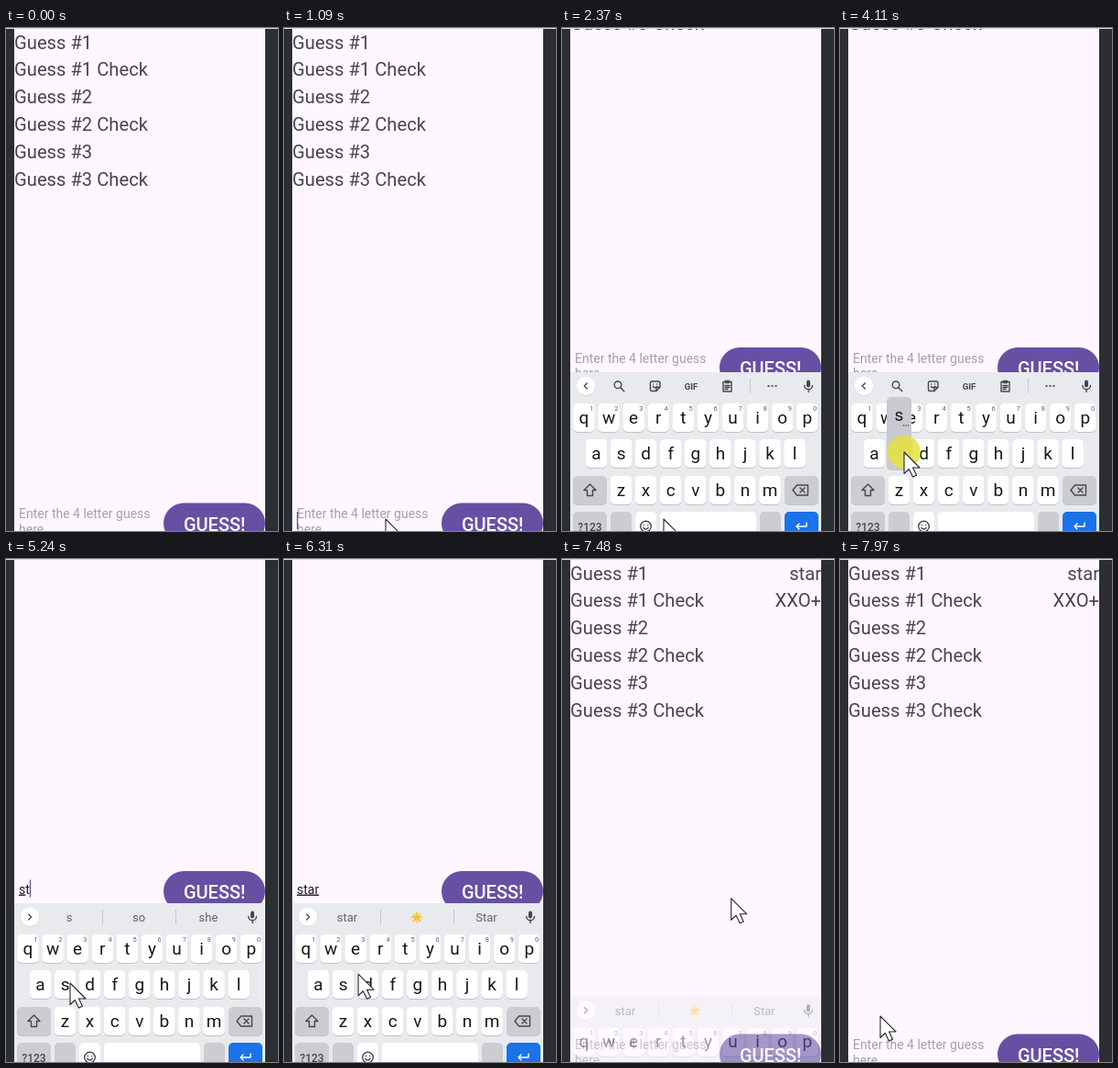
An HTML page for the animation above (8 s loop, 297x548 px).

```html
<!DOCTYPE html>
<html lang="en">
<head>
<meta charset="utf-8">
<title>Word guess</title>
<style>
html, body { margin: 0; width: 100%; height: 100%; overflow: hidden; background: #2b2e33; }
svg { display: block; width: 297px; height: 548px; font-family: Roboto, sans-serif; }
.row { font-size: 20.2px; fill: #49454f; }
.field { font-size: 14px; fill: #1d1b20; }
.hint { fill: #a5a0a8; }
.label { font-size: 20px; font-weight: 500; fill: #fff; }
.key { font-size: 19px; fill: #17181a; }
.digit { font-size: 7.5px; fill: #5f6368; }
.word { font-size: 13px; fill: #5f6368; }
.mid { text-anchor: middle; }
.end { text-anchor: end; }
.icon { fill: none; stroke: #44474b; stroke-width: 1.4; stroke-linecap: round; stroke-linejoin: round; }
</style>
</head>
<body>
<svg viewBox="0 0 297 548">
  <defs><clipPath id="screenClip"><path d="M9 1h274v547H9z"/></clipPath></defs>
  <rect width="297" height="548" fill="#2b2e33"/>
  <rect width="297" height="1" fill="#dcd8de"/>
  <g clip-path="url(#screenClip)">
    <rect x="9" y="1" width="274" height="547" fill="#fef7ff"/>
    <g id="content">
      <g id="rows" class="row"></g>
      <g id="results" class="row end"><text x="283" y="22.5">star</text><text x="283" y="52.3">XXO+</text></g>
      <g id="hint">
        <text class="field hint" x="14" y="534">Enter the 4 letter guess</text>
        <text class="field hint" x="14" y="550.5">here</text>
        <rect x="14" y="555" width="152" height="1.2" fill="#605a72"/>
      </g>
      <text id="input" class="field" x="14" y="542"><tspan id="marked" text-decoration="underline"></tspan><tspan id="fresh"></tspan></text>
      <rect id="caret" y="527" width="1.3" height="19" fill="#6750a4"/>
      <rect id="button" x="172" y="517.5" width="111" height="44" rx="22"/>
      <text class="label mid" x="227.7" y="547.5">GUESS!</text>
    </g>
    <rect id="gap" x="9" y="414" width="274" height="134"/>
    <g id="keyboard">
      <rect x="9" y="375" width="274" height="190" fill="#e8eaed"/>
      <circle cx="26" cy="390.5" r="10.3" fill="#c8cacd"/>
      <circle cx="26" cy="390" r="10.2" fill="#fff"/>
      <g class="icon">
        <rect x="267" y="383.5" width="4" height="8" rx="2" fill="#44474b" stroke="none"/>
        <path d="M264.8 389.5a4.3 4.3 0 0 0 8.6 0M269.1 394v2.5"/>
      </g>
      <g id="tools">
        <g class="icon">
          <path d="M27.3 387l-3 3 3 3M63.8 391.8l4 4"/>
          <circle cx="61" cy="388.8" r="3.8"/>
          <path d="M98 385h7.5q1.5 0 1.5 1.5v5l-4 4h-5q-1.500 0-1.500-1.500v-7.500q0-1.500 1.500-1.500zM99.500 390.500q2 2.500 4.500 0M99.700 388h.1M103.500 388h.1M103 395v-3.500h4"/>
          <path d="M176 385.500h9v10.500h-9zM178.500 384.500h4v2h-4zM178 389.500h5M178 391.500h5M178 393.500h3"/>
          <path d="M225.500 390h.1M229.500 390h.1M233.500 390h.1" stroke-width="2.200"/>
        </g>
        <text class="mid" x="141" y="393.500" font-size="9.500" font-weight="700" fill="#44474b">GIF</text>
        <path d="M205.500 382v16" stroke="#c6c8cb"/>
      </g>
      <g id="words">
        <path class="icon" d="M24.700 387l3 3-3 3"/>
        <path d="M105.500 382v16M185.500 382v16" stroke="#c6c8cb"/>
        <text class="word mid" x="69" y="395"></text>
        <text class="word mid" x="145" y="395"></text>
        <text class="word mid" x="221" y="395"></text>
        <g id="glow" transform="translate(145 390.500)">
          <path d="M-4.500-4.500l9 9M4.500-4.500l-9 9M-6.500 0h13M0-6.500v13" stroke="#f7cf6a" stroke-width="1.500"/>
          <polygon id="star" fill="#fbc02d"/>
        </g>
      </g>
      <g id="keys"></g>
      <g class="icon">
        <path d="M30.500 497l-6.500 6.500h3.500v6h6v-6h3.500z"/>
        <path d="M256.500 498h12v11h-12l-4.500-5.500zM260 501l5 5M265 501l-5 5"/>
        <circle cx="91.500" cy="543" r="5.800"/>
        <path d="M89.300 541.500h.1M93.700 541.500h.1M88.800 544.500q2.700 3 5.400 0"/>
        <path d="M267 539v4h-11M259 540l-3 3 3 3" stroke="#fff"/>
      </g>
      <text class="mid" x="30.500" y="547.500" font-size="12" font-weight="500" fill="#44474b">?123</text>
      <g id="popup">
        <rect x="51" y="402" width="27" height="80" rx="5" fill="#c8cad0"/>
        <text class="key mid" x="64.500" y="428">s</text>
        <path d="M69.500 433h.1M72 433h.1M74.500 433h.1" class="icon" stroke-width="1"/>
      </g>
    </g>
  </g>
  <g id="pointer">
    <circle id="press" r="18" fill="#e6e23c" opacity=".85"/>
    <path d="M0 0v23.500l5.300-5 4.200 8.500 4-1.800-4-8.200h7.500z" fill="#fff" stroke="#26262a" stroke-width="1.100" stroke-linejoin="round"/>
  </g>
</svg>
<script>
const $ = id => document.getElementById(id);
const show = (id, on) => $(id).setAttribute('visibility', on ? 'visible' : 'hidden');
const move = (id, x, y) => $(id).setAttribute('transform', `translate(${x} ${y})`);

$('rows').innerHTML = [0, 1, 2, 3, 4, 5].map(i =>
  `<text x="9" y="${22.5 + i * 29.8}">Guess #${(i >> 1) + 1}${i % 2 ? ' Check' : ''}</text>`).join('');

$('star').setAttribute('points', Array.from({ length: 10 }, (_, i) => {
  const r = i % 2 ? 2.6 : 6, a = i * Math.PI / 5;
  return [r * Math.sin(a), -r * Math.cos(a)].map(v => v.toFixed(2));
}).join(' '));

// Keyboard caps
const cap = (x, y, w, fill = '#fff') =>
  `<rect x="${x}" y="${y + 1}" width="${w}" height="31" rx="5" fill="#bfc2c6"/>` +
  `<rect x="${x}" y="${y}" width="${w}" height="31" rx="5" fill="${fill}"/>`;
const letters = (text, x0, y, digits) => [...text].map((c, i) => {
  const x = x0 + i * 27.08;
  return cap(x - 11.8, y, 23.6) + `<text class="key mid" x="${x}" y="${y + 21.5}">${c}</text>` +
    (digits ? `<text class="digit mid" x="${x + 8.3}" y="${y + 8}">${(i + 1) % 10}</text>` : '');
}).join('');
const GREY = '#cbcdd2';
$('keys').innerHTML =
  letters('qwertyuiop', 24, 409, true) + letters('asdfghjkl', 37.5, 448) + letters('zxcvbnm', 64.5, 488) +
  cap(12, 488, 37, GREY) + cap(243, 488, 37, GREY) +
  cap(12, 527, 37, GREY) + cap(53, 527, 23, GREY) + cap(80, 527, 23) +
  cap(107, 527, 105) + cap(216, 527, 23, GREY) + cap(243, 527, 37, '#1a73e8');

// Timelines: [time, values...]
const pointerPath = [
  [380, 142, 546], [730, 111, 535], [2400, 111, 535], [2930, 54, 462], [3150, 53, 466], [3400, 52, 462],
  [3830, 52, 462], [4050, 70, 462], [6230, 70, 462], [6720, 222, 328], [6950, 224, 346],
  [7300, 224, 346], [7900, 44, 455], [7970, 44, 498]];
const scrollPath = [[2160, -149.5], [2340, -169.5]];
const keyboardPath = [[1740, 173, 0], [1970, 0, 1], [7330, 0, 1], [7600, 173, 0]];
const typing = [[0, '', ''], [4280, 's', ''], [5240, 's', 't'], [5440, 'st', ''], [5510, 'st', 'a'],
  [5710, 'sta', 'r'], [5910, 'star', ''], [7280, '', '']];
const suggestions = [[4430, 's', 'so', 'she'], [5440, 'st', 'still', 'stop'],
  [5640, 'sta', 'stay', 'star'], [5980, 'star', '', 'Star']];
const caretOn = [[1070, 1570], [2490, 3000], [3490, 3990], [4280, 4780], [5240, 6240], [6710, 7210]];
const pressed = [[800, 1090], [4050, 4280], [7140, 7280]];

const within = (spans, t) => spans.some(([a, b]) => t >= a && t < b);
const latest = (steps, t) => steps.findLast(s => s[0] <= t);
function tween(path, t) {
  const i = path.findIndex(p => p[0] > t);
  if (i < 1) return (i ? path.at(-1) : path[0]).slice(1);
  const [a, b] = [path[i - 1], path[i]];
  const u = (t - a[0]) / (b[0] - a[0]), e = u * u * (3 - 2 * u);
  return a.slice(1).map((v, k) => v + (b[k + 1] - v) * e);
}

function draw(t) {
  const resized = t >= 1770 && t < 7350;
  const [, marked, fresh] = latest(typing, t);
  const typed = marked + fresh;
  move('content', 0, !resized ? 0 : t >= 4280 ? -177.5 : tween(scrollPath, t)[0]);
  show('gap', resized);
  show('results', t >= 7280);
  show('hint', !typed);
  $('marked').textContent = marked;
  $('fresh').textContent = fresh;
  $('caret').setAttribute('x', 14 + (typed ? $('input').getComputedTextLength() : 0));
  show('caret', within(caretOn, t));
  $('button').setAttribute('fill', t >= 6650 && t < 7350 ? '#8a76b7' : '#6750a4');

  const [drop, alpha] = tween(keyboardPath, t);
  move('keyboard', 0, drop);
  $('keyboard').setAttribute('opacity', alpha);
  const words = latest(suggestions, t);
  show('tools', !words);
  show('words', words);
  show('glow', words && !words[2]);
  if (words) $('words').querySelectorAll('text').forEach((el, i) => el.textContent = words[i + 1]);
  show('popup', t >= 4050 && t < 4280);

  move('pointer', ...tween(pointerPath, t));
  $('pointer').setAttribute('display', t >= 390 ? 'inline' : 'none');
  show('press', within(pressed, t));
}

(function frame() {
  draw(performance.now() % 8000);
  requestAnimationFrame(frame);
})();
</script>
</body>
</html>
```
